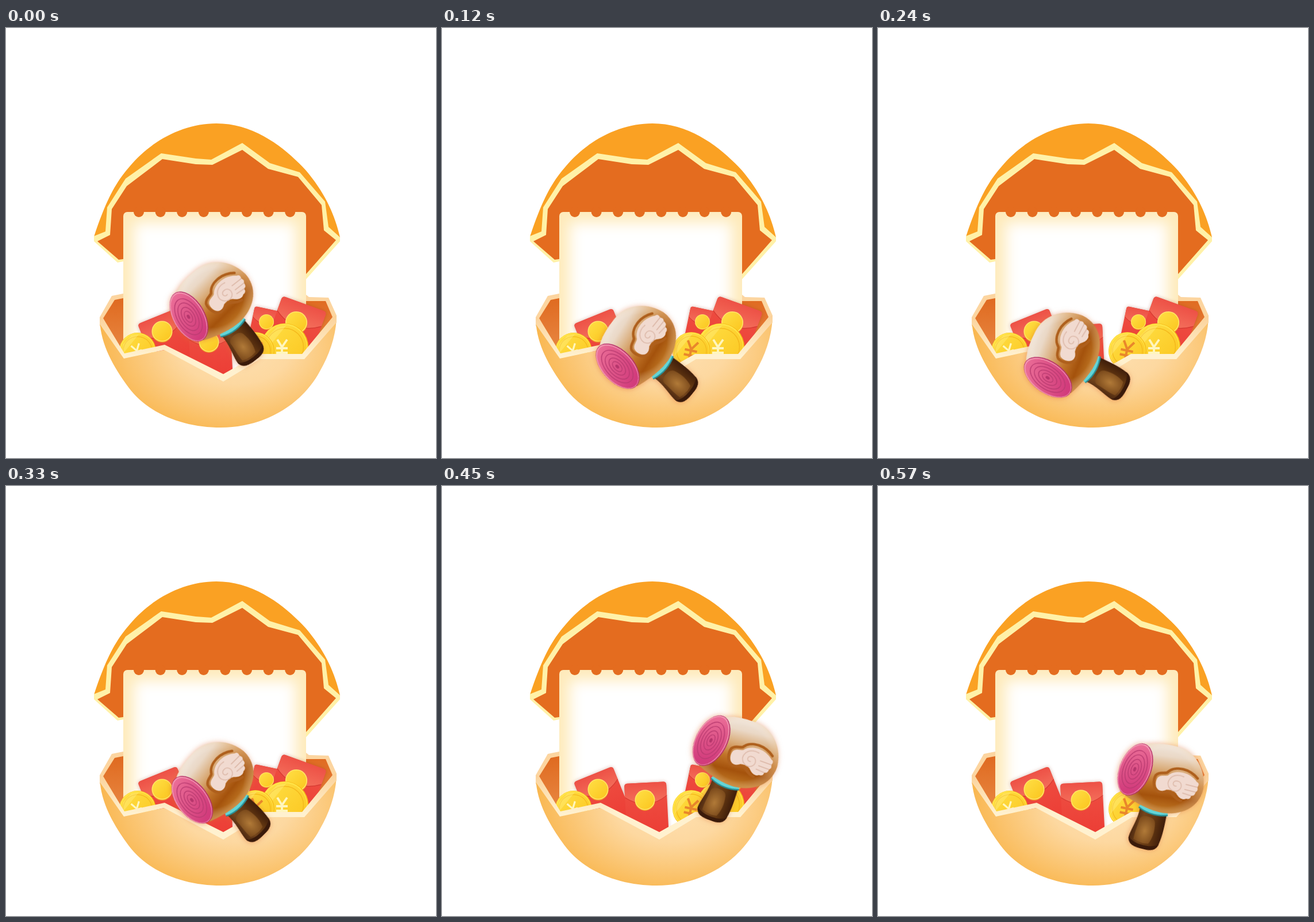
Animation of 748x748 px, one loop 0.6 s. Source, as an HTML page:

```html
<!DOCTYPE html>
<html lang="en">
<head>
<meta charset="utf-8">
<title>Mallet and egg</title>
<style>
html, body { margin: 0; height: 100%; overflow: hidden; background: #fff; }
svg { display: block; width: 100vw; height: 100vh; }
.soft { filter: drop-shadow(0 0 3px rgba(150, 50, 20, .35)); }
#mallet { filter: drop-shadow(-1px 0 5px rgba(222, 105, 50, .5)); }
</style>
</head>
<body>
<svg viewBox="0 0 748 748" fill="none">
<defs>
  <radialGradient id="shell" gradientUnits="userSpaceOnUse" cx="0" cy="0" r="1" gradientTransform="translate(398 555) scale(235 154)">
    <stop stop-color="#fee0b2"/><stop offset=".42" stop-color="#fdd8a0"/><stop offset="1" stop-color="#f9b750"/>
  </radialGradient>
  <linearGradient id="inside" x2="0" y2="1">
    <stop stop-color="#df6a20"/><stop offset="1" stop-color="#e98a45"/>
  </linearGradient>
  <linearGradient id="rim" x2="0" y2="1">
    <stop stop-color="#fbd199"/><stop offset=".6" stop-color="#fff1cf"/>
  </linearGradient>
  <linearGradient id="red" x2="0" y2="1">
    <stop stop-color="#ee5043"/><stop offset="1" stop-color="#ec3d35"/>
  </linearGradient>
  <linearGradient id="flap" x2="0" y2="1">
    <stop stop-color="#ed5146"/><stop offset="1" stop-color="#f4705c"/>
  </linearGradient>
  <linearGradient id="gold" x2="1" y2="1">
    <stop stop-color="#ffdf45"/><stop offset="1" stop-color="#fbc51e"/>
  </linearGradient>
  <linearGradient id="wood" x2=".12" y2="1">
    <stop stop-color="#f1e8e0"/><stop offset=".22" stop-color="#ead8c6"/><stop offset=".42" stop-color="#d9ab78"/>
    <stop offset=".62" stop-color="#c1752a"/><stop offset=".82" stop-color="#a4520c"/><stop offset="1" stop-color="#bd7422"/>
  </linearGradient>
  <radialGradient id="edge" cx=".46" cy=".5" r=".56">
    <stop offset=".72" stop-color="#fff" stop-opacity="0"/><stop offset="1" stop-color="#f5c993" stop-opacity=".4"/>
  </radialGradient>
  <linearGradient id="pink" x2=".3" y2="1">
    <stop stop-color="#ee749b"/><stop offset=".5" stop-color="#df578a"/><stop offset="1" stop-color="#d23c7c"/>
  </linearGradient>
  <linearGradient id="grip">
    <stop stop-color="#4a260f"/><stop offset=".3" stop-color="#74451c"/>
    <stop offset=".65" stop-color="#633711"/><stop offset="1" stop-color="#3d1c0a"/>
  </linearGradient>
  <radialGradient id="shine" cx=".5" cy=".55" r=".6">
    <stop stop-color="#b17a38"/><stop offset="1" stop-color="#7a491b"/>
  </radialGradient>
  <filter id="blur"><feGaussianBlur stdDeviation="12"/></filter>
  <clipPath id="sheet"><rect x="204" y="320" width="318" height="290" rx="7"/></clipPath>

  <g id="envelope">
    <rect width="73" height="92" rx="5" fill="url(#red)"/>
    <path d="M0 24V5Q0 0 5 0H68Q73 0 73 5V24Q55 37 36 37Q18 37 0 24Z" fill="url(#flap)"/>
    <path d="M0 24Q18 37 36 37Q55 37 73 24" stroke="#d63a32" stroke-width="1.2"/>
  </g>
  <g id="seal">
    <circle cy="1.5" r="18" fill="#f19a25"/>
    <circle r="18" fill="#ffe467"/>
    <circle r="16.5" fill="url(#gold)"/>
  </g>
  <g id="coin">
    <circle r="33" fill="#f7b916"/>
    <circle cx="-.6" cy="-.6" r="32" fill="#ffe449"/>
    <circle r="30.5" fill="url(#gold)"/>
    <circle r="26" stroke="#f4b91d" stroke-width="1.3"/>
    <path d="M-26-12L-11-28L2-30L-29 8Z" fill="#ffed83" opacity=".4"/>
  </g>
  <path id="yen" d="M-8-15L0-2L9-15M0-2V17M-10 0H10M-10 8H10" stroke-width="3.8"/>
  <path id="body" d="M-54-50C-40-57-15-60 5-59C33-57 58-32 61 2C61 35 35 56 0 59C-25 60-50 52-68 45Z"/>
</defs>

<!-- upper shell -->
<path d="M153 363C176 293 194 265 215 241C253 195 310 166 366 166C434 166 488 211 522 248C555 287 572 325 581 364Z" fill="#faa123"/>
<path d="M153 362L173 354L176 312L208 262L270 218L330 227L357 229L411 200L459 235L511 251L555 302L561 346L581 364V371L522 437L204 406L194 408L153 371Z" fill="#fff1a8"/>
<path d="M159 371L181 360L184 315L210 275L272 228L330 237L359 238L411 212L456 245L508 259L549 308L553 352L574 369L522 428L204 402L196 403Z" fill="#e46c1f"/>

<!-- back of lower shell -->
<path d="M163 503L184 466L204 462L522 464L527 468L561 469L575 500V512L518 575H205L163 518Z" fill="#fcd5a0"/>
<path d="M169 505L189 473L204 470L522 475H556L568 503L516 572H206Z" fill="url(#inside)"/>

<!-- paper -->
<g clip-path="url(#sheet)">
  <path d="M204 320H522V610H204Z" fill="#feeaba"/>
  <path d="M222 338H504V720H222Z" fill="#fff" filter="url(#blur)"/>
</g>
<g id="holes" fill="#e46c1f"></g>

<!-- gifts -->
<g class="soft">
  <use href="#envelope" transform="translate(229 515) rotate(-22)"/>
  <use href="#envelope" transform="translate(317 518) rotate(-3)"/>
  <use href="#envelope" transform="translate(433 484) rotate(12) scale(.78)"/>
  <use href="#envelope" transform="translate(481 466) rotate(20) scale(1.12)"/>
</g>
<use href="#seal" transform="translate(271.5 527.5)"/>
<use href="#seal" transform="translate(353 546) scale(.97)"/>
<use href="#seal" transform="translate(453 511) scale(.72)"/>
<use href="#seal" transform="translate(505 512) scale(1.06)"/>
<use href="#coin" transform="translate(229 562) scale(.97)"/>
<use href="#yen" transform="translate(228 563) rotate(-18) scale(.85)" stroke="#fff6bd"/>
<use href="#coin" transform="translate(485 555) scale(1.25)"/>
<use href="#yen" transform="translate(480 557)" stroke="#fff6bd"/>
<use href="#coin" transform="translate(434 562)"/>
<use href="#yen" transform="translate(433 561) rotate(12) scale(1.08)" stroke="#e9872b"/>

<!-- front of lower shell -->
<path d="M163 503L205 574L276 560L378 614L440 576H518L575 503C574 535 563 568 546 597C515 655 450 695 374 695C310 695 248 672 213 625C186 588 163 548 163 503Z" fill="url(#shell)"/>
<path d="M163 503L169 505L206 566L276 551L378 602L440 567H515L568 503L575 500V512L519 576H442L378 615L275 560L205 575L163 515Z" fill="url(#rim)"/>

<g id="mallet">
  <path d="M-38 58C-36 78-44 98-45 112C-44 127-30 128-16 128C-3 128 7 126 9 113C12 97 11 80 10 58Z" fill="url(#grip)"/>
  <path d="M-45 112C-44 127-30 128-16 128C-3 128 7 126 9 113C3 124-36 125-45 112Z" fill="#3a1a0a"/>
  <path d="M-34 79Q-33 72-24 71Q-8 70-6 80C-3 94-4 106-9 117Q-22 120-36 115C-37 102-34 90-34 79Z" fill="url(#shine)"/>
  <path d="M-39 56Q-15 67 11 58" stroke="#288f96" stroke-width="9"/>
  <path d="M-39 55Q-15 66 11 57" stroke="#62d5d8" stroke-width="6"/>
  <use href="#body" fill="url(#wood)"/>
  <use href="#body" fill="url(#edge)"/>
  <g stroke-linecap="round" stroke-linejoin="round">
    <path d="M47-14C28-28 2-26-7-11C-12-8-20-10-25-2C-28 8-24 22-14 25C-7 26-3 21 4 21C12 21 14 30 28 31" stroke="#ae5f1c" stroke-width="4.5"/>
    <path d="M47-8Q54-6 50 1Q54 6 49 10Q50 17 43 18Q44 25 36 25C30 30 22 26 17 20C10 16 5 17-1 18Q-6 23-13 22C-22 20-24 6-20 0C-14-6-8-4-4-7C6-20 30-22 47-8Z" fill="#f1dad0"/>
    <path d="M14 8C7 10 5 0 13-1C24-3 27 13 15 17C3 18-5 8 1-3C5-10 14-13 23-11M30 1H50M30 10H49M28 17L43 18" stroke="#dfbdae" stroke-width="1.8"/>
  </g>
  <g transform="translate(-62 -3) rotate(8)">
    <ellipse rx="27.5" ry="47.5" fill="#b52d67"/>
    <ellipse cx="-.8" rx="26.5" ry="46.5" fill="#f59ab5"/>
    <ellipse cx="-.8" cy=".6" rx="25" ry="45" fill="url(#pink)"/>
    <g id="rings" stroke="#ba3b71" stroke-width="1.4"></g>
    <ellipse cx="-1" rx="2.5" ry="4" fill="#b5366c"/>
  </g>
</g>
</svg>
<script>
const get = id => document.getElementById(id);

get('holes').innerHTML = Array.from({ length: 8 }, (_, i) =>
  `<circle cx="${231 + i * 37.6}" cy="320" r="9"/>`).join('');
get('rings').innerHTML = [.78, .6, .41, .24].map(s =>
  `<ellipse cx="-1" rx="${25 * s}" ry="${44 * s}"/>`).join('');

// time, x, y, angle
const keys = [
  [0, 369, 466, -38],
  [120, 347, 542, -51],
  [180, 293, 586, -68],
  [240, 327, 554, -62.5],
  [330, 370, 504, -45],
  [390, 479, 468, 0],
  [420, 510, 458, 13],
  [450, 526, 467, 20],
  [570, 507, 511, 14]
];

function slope(i, k) {
  const a = keys[Math.max(i - 1, 0)], b = keys[Math.min(i + 1, keys.length - 1)];
  return (b[k] - a[k]) / (b[0] - a[0]);
}

// Cubic Hermite curve through the keys
function pose(t) {
  const i = Math.max(0, keys.findIndex(key => key[0] >= t) - 1);
  const a = keys[i], b = keys[i + 1], d = b[0] - a[0], u = (t - a[0]) / d, v = 1 - u;
  return [1, 2, 3].map(k =>
    v * v * (1 + 2 * u) * a[k] + u * u * (3 - 2 * u) * b[k] +
    d * u * v * (v * slope(i, k) - u * slope(i + 1, k)));
}

const start = performance.now(), step = 30, loop = 600;

function draw() {
  const t = Math.floor((performance.now() - start) % loop / step) * step;
  const [x, y, angle] = pose(t);
  get('mallet').setAttribute('transform', `translate(${x} ${y}) rotate(${angle})`);
  requestAnimationFrame(draw);
}
draw();
</script>
</body>
</html>
```
